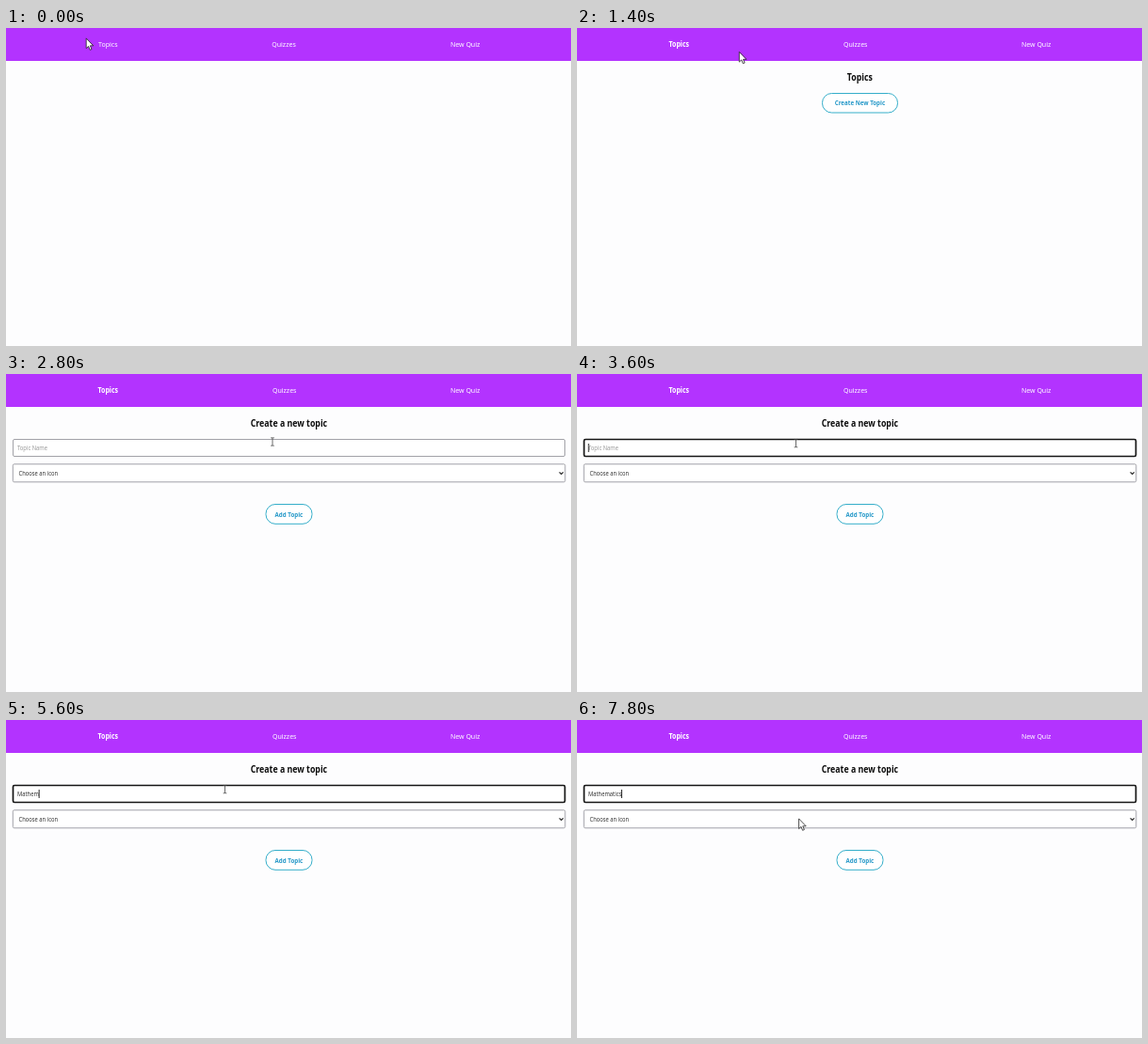
Animation, 600 px wide and 338 px high, one loop 8 s. Source, as an HTML page:

```html
<!DOCTYPE html>
<html lang="en">
<head>
<meta charset="utf-8">
<title>Create a topic</title>
<style>
  html, body { margin: 0; width: 100%; height: 100%; overflow: hidden; background: #fdfdfe; }
  svg { display: block; width: 100vw; height: 100vh; }
  text { font-family: "Noto Sans", "Open Sans", sans-serif; white-space: pre; }
  .nav { font-size: 8px; fill: #fff; }
  .head { font-size: 10px; font-weight: 700; fill: #0c0c0c; }
  .btn { font-size: 7.05px; font-weight: 700; fill: #2498c8; }
  .field { font-size: 6.6px; fill: #333; }
  .hint { fill: #999; }
  .bold { font-weight: 700; }
  .mid { text-anchor: middle; }
  .pill { fill: #fff; stroke: #35aeca; }
</style>
</head>
<body>
<svg viewBox="0 0 600 338">
  <rect width="600" height="338" fill="#fdfdfe"/>
  <rect width="600" height="35" fill="#b333ff"/>
  <g id="nav"></g>
  <g id="topics">
    <rect class="pill" x="260.5" y="69.5" width="80" height="20.5" rx="10"/>
  </g>
  <g id="form">
    <rect id="box" x="7.5" y="69.5" width="586" height="18" rx="1.5" fill="#fff"/>
    <rect x="7.3" y="95.8" width="586.5" height="19" rx="1.5" fill="#fff" stroke="#a2a2a8"/>
    <path d="M587.6 104.3l2.1 2.1 2.1-2.1" fill="none" stroke="#222" stroke-width="1.2"/>
    <rect class="pill" x="276" y="138.5" width="49" height="20.8" rx="10"/>
    <rect id="caret" y="74" width=".9" height="9" fill="#111"/>
  </g>
  <g id="cursor" stroke-linejoin="round" stroke-linecap="round">
    <path id="arrow" d="M0 0V10.3L2.4 8.1 4 12 5.8 11.2 4.2 7.5H7.2Z" fill="#fff" stroke="#222" stroke-width=".8"/>
    <path id="hand" d="M-1 1Q0-.6 1 1V4.6Q2-.2 2.7 5 3.6 3.7 4.3 5.4 5.6 4.6 5.6 6.4V9.2L4.4 12.8H-.8L-3.6 8.6Q-4.6 6.4-2.6 7L-1 8.2Z" fill="#fff" stroke="#222" stroke-width=".8"/>
    <path id="beam" d="M-1.4-4.2H-.4L0-3.8 .4-4.2H1.4M0-3.8V3.8M-1.4 4.2H-.4L0 3.8 .4 4.2H1.4" fill="none" stroke="#444" stroke-width=".8"/>
  </g>
</svg>
<script>
const LOOP = 8000;
const NARROW = 0.88; // width of the slightly condensed face
const $ = id => document.getElementById(id);

function label(parent, str, x, y, cls) {
  const el = document.createElementNS("http://www.w3.org/2000/svg", "text");
  el.setAttribute("transform", `translate(${x} ${y}) scale(${NARROW} 1)`);
  el.setAttribute("class", cls);
  el.textContent = str;
  $(parent).append(el);
  return el;
}

const navTopics = label("nav", "Topics", 108.3, 20, "nav mid");
const quizzesOff = label("nav", "Quizzes", 295, 20, "nav mid");
const quizzesOn = label("nav", "Quizzes", 295.7, 20, "nav mid");
label("nav", "New Quiz", 487.6, 20, "nav mid");
label("topics", "Topics", 300.3, 56, "head mid");
label("topics", "Create New Topic", 300.4, 82.3, "btn mid");
label("form", "Create a new topic", 300.4, 56, "head mid");
label("form", "Choose an icon", 13.5, 107.8, "field");
label("form", "Add Topic", 300.4, 151.6, "btn mid");
const hint = label("form", "Topic Name", 12, 81, "field hint");
const typed = label("form", "", 12, 81, "field");

// [start ms, value]
const pages = [[0, "blank"], [1000, "topics"], [2800, "form"]];
const moves = [
  [0, ["arrow", 85.2, 11.3]], [400, ["arrow", 91, 14]], [600, ["arrow", 99, 18]],
  [800, ["hand", 106, 20.5]], [1400, ["arrow", 172.3, 25.8]],
  [1600, ["arrow", 215, 44]], [1800, ["arrow", 260, 62]], [2000, ["hand", 283, 72]],
  [2600, ["beam", 283, 72]], [3200, ["beam", 262, 73]], [3400, ["beam", 240, 73.4]],
  [3600, ["beam", 232.5, 73.6]], [7600, ["beam", 234, 84]], [7800, ["arrow", 235.6, 105.3]]
];
const WORD = "Mathematics";
const lengths = [
  [0, 0], [4800, 1], [5000, 2], [5200, 3], [5400, 4], [5600, 6],
  [5800, 8], [6000, 6], [6400, 10], [6800, 11]
];
const blinks = [[0, false], [3600, true], [4200, false], [4800, true], [7400, false], [7800, true]];

const at = (steps, t) => steps.findLast(s => s[0] <= t)[1];
const show = (el, on) => el.setAttribute("display", on ? "inline" : "none");

function draw(t) {
  const page = at(pages, t);
  const blank = page === "blank";
  show($("topics"), page === "topics");
  show($("form"), page === "form");
  navTopics.classList.toggle("bold", !blank);
  show(quizzesOff, blank);
  show(quizzesOn, !blank);

  const focus = t >= 3600;
  $("box").setAttribute("stroke", focus ? "#151515" : "#a2a2a8");
  $("box").setAttribute("stroke-width", focus ? 1.7 : 1);

  const n = at(lengths, t);
  typed.textContent = WORD.slice(0, n);
  show(hint, n === 0);
  const caretOn = at(blinks, t);
  show($("caret"), caretOn);
  if (caretOn) {
    const w = n ? typed.getComputedTextLength() * NARROW : 0;
    $("caret").setAttribute("x", 11.8 + w);
  }

  const [kind, x, y] = at(moves, t);
  $("cursor").setAttribute("transform", `translate(${x} ${y})`);
  for (const id of ["arrow", "hand", "beam"]) show($(id), id === kind);
}

const start = performance.now();
function tick(now) {
  draw(Math.max(0, now - start) % LOOP);
  requestAnimationFrame(tick);
}
draw(0);
requestAnimationFrame(tick);
</script>
</body>
</html>
```
